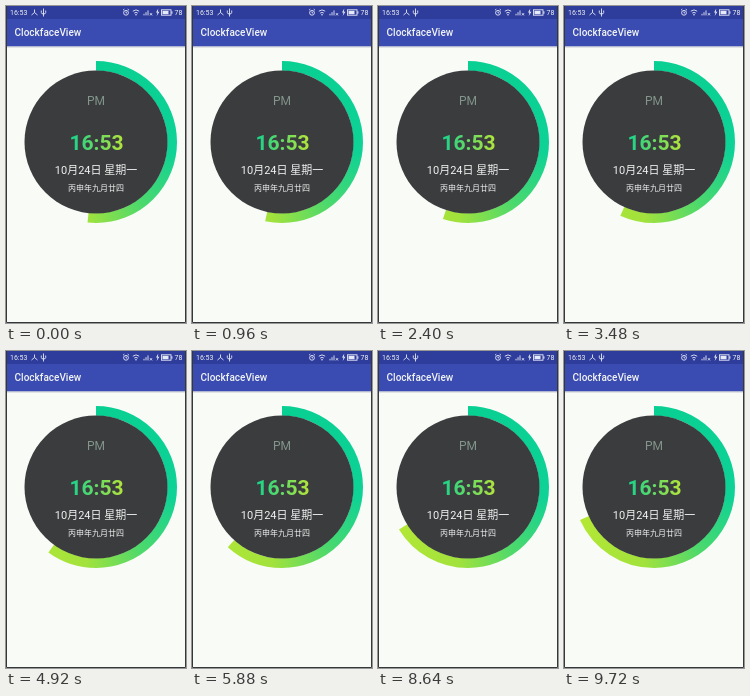
Write an HTML page with a canvas that moves like this. It is 180 px wide and 317 px high and loops after 9.84 s.

```html
<!DOCTYPE html>
<html lang="zh-CN">
<head>
<meta charset="utf-8">
<title>ClockfaceView</title>
<style>
  html, body { margin: 0; width: 100%; height: 100%; overflow: hidden; background: #f9fbf7; }
  canvas, svg { position: absolute; left: 0; top: 0; width: 180px; height: 317px; }
  text { font-family: Roboto, "Noto Sans CJK SC", "Noto Sans CJK", sans-serif; fill: #f2f4f2; }
  .mid { text-anchor: middle; }
  .line { fill: none; stroke: #e6e9f8; stroke-width: .9; }
  .solid { fill: #e6e9f8; }
</style>
</head>
<body>
<canvas id="ring"></canvas>
<svg viewBox="0 0 180 317">
  <defs>
    <linearGradient id="lime" gradientUnits="userSpaceOnUse" x1="64" y1="0" x2="117" y2="0">
      <stop offset="0" stop-color="#18d28c"/>
      <stop offset="1" stop-color="#b2e43c"/>
    </linearGradient>
  </defs>

  <rect width="180" height="13" fill="#2e3c9b"/>
  <rect y="13" width="180" height="27.5" fill="#3a4bb2"/>
  <rect y="40.5" width="180" height="1" fill="#c9ccd4"/>

  <!-- status bar -->
  <text x="4" y="9" font-size="7">16:53</text>
  <path class="line" d="M28.5 3.5v3M25.5 9l3-2.5 3 2.5"/>
  <path class="line" d="M37.5 2.5v8M35.3 4.5v2q0 1.5 2.2 1.5t2.2-1.5v-2"/>
  <circle class="line" cx="120" cy="6.8" r="2.4"/>
  <path class="line" d="M117 4.2l1.3-1.1M123 4.2l-1.3-1.1M120 5.5v1.4h1"/>
  <path class="line" d="M126.8 5.2q3.2-2.6 6.4 0M128.2 7.1q1.8-1.4 3.6 0"/>
  <circle class="solid" cx="130" cy="8.8" r=".8"/>
  <path class="line" d="M138 9.4v-1.6M140 9.4v-3.2M142 9.4v-5M144 7.2l2 2.2M146 7.2l-2 2.2"/>
  <path class="solid" d="M152.3 2.6l-2.3 4h1.5l-.8 3.4 2.7-4.3h-1.6z"/>
  <rect class="line" x="155.5" y="3.8" width="9.5" height="5.4"/>
  <rect class="solid" x="156.5" y="4.8" width="6" height="3.4"/>
  <rect class="solid" x="165.4" y="5.3" width="1" height="2.4"/>
  <text x="168.5" y="9" font-size="7">78</text>

  <text x="8.6" y="30.2" font-size="10" font-weight="500">ClockfaceView</text>

  <!-- clock face -->
  <circle cx="90" cy="136" r="71.5" fill="#3a3c3e"/>
  <text class="mid" x="90" y="99.3" font-size="12" style="fill:#84958b">PM</text>
  <text class="mid" x="90.5" y="144" font-size="21" font-weight="700" style="fill:url(#lime)">16:53</text>
  <text class="mid" x="90" y="168" font-size="11">10月24日 星期一</text>
  <text class="mid" x="90" y="184.8" font-size="8">丙申年九月廿四</text>

  <path d="M.5 0V316.5H179.5V0" fill="none" stroke="#34373c"/>
</svg>
<script>
  const LOOP = 9840, FRAME = 120, MOVE = 500;
  const FIRST = 186, STEP = 6;
  const ticks = [400, 1530, 2530, 3380, 4350, 5310, 6270, 7270, 8310, 9160];
  const rad = deg => (deg - 90) * Math.PI / 180;

  const canvas = document.getElementById('ring');
  const scale = window.devicePixelRatio || 1;
  canvas.width = 180 * scale;
  canvas.height = 317 * scale;
  const ctx = canvas.getContext('2d');
  ctx.scale(scale, scale);

  const sweep = ctx.createConicGradient(rad(0), 90, 136);
  sweep.addColorStop(0, '#08cf92');
  sweep.addColorStop(.27, '#0ed296');
  sweep.addColorStop(.4, '#4cd96c');
  sweep.addColorStop(.52, '#a2e23c');
  sweep.addColorStop(.7, '#b6e834');
  sweep.addColorStop(1, '#b6e834');
  ctx.strokeStyle = sweep;
  ctx.lineWidth = 9.8;

  // Each tick eases the arc one second further.
  function angleAt(t) {
    return ticks.reduce((deg, start) => {
      const p = Math.min(1, Math.max(0, (t - start) / MOVE));
      return deg + STEP * (1 - Math.cos(Math.PI * p)) / 2;
    }, FIRST);
  }

  const begin = performance.now();
  function draw() {
    const t = (performance.now() - begin) % LOOP;
    const shown = Math.floor(t / FRAME) * FRAME;
    ctx.clearRect(0, 0, 180, 317);
    ctx.beginPath();
    ctx.arc(90, 136, 76.1, rad(0), rad(angleAt(shown)));
    ctx.stroke();
    requestAnimationFrame(draw);
  }
  draw();
</script>
</body>
</html>
```
